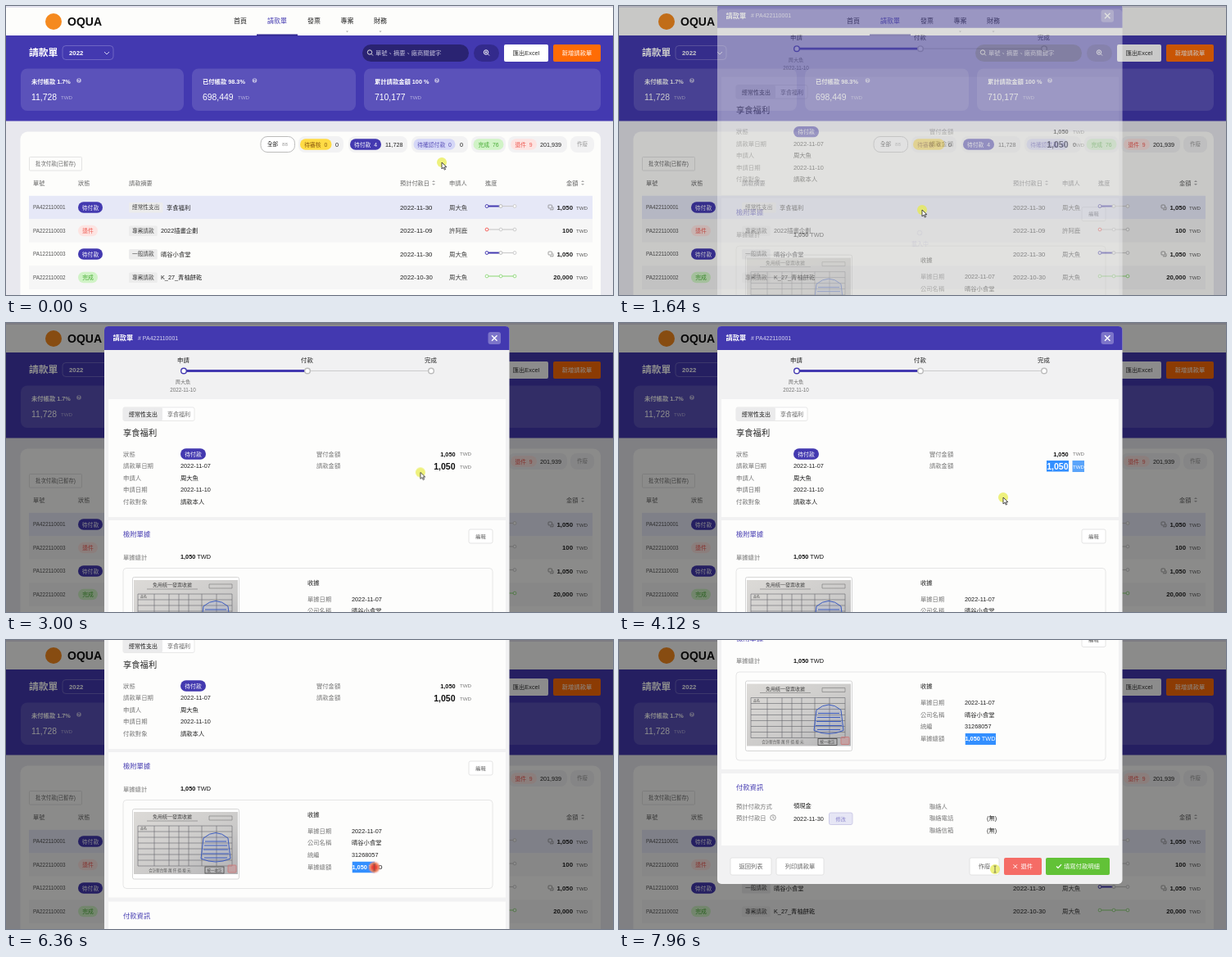
Write an HTML page that moves like this. It is 741 by 353 pixels and loops after 8 s.

```html
<!DOCTYPE html>
<html>
<head>
<meta charset="utf-8">
<title>請款單</title>
<style>
  html, body { margin: 0; width: 100%; height: 100%; overflow: hidden; background: #e8e8ee; }
  svg { display: block; width: 741px; height: 353px; }
  text { font-family: 'Liberation Sans', 'Noto Sans CJK TC', 'Noto Sans CJK', sans-serif; white-space: pre; }
</style>
</head>
<body>
<svg id="stage" viewBox="0 0 741 353"></svg>
<script>
const LOOP = 8000;
const INDIGO = '#4339b0', INK = '#222', GREY = '#777', RED = '#f4655f';

// Drawing helpers; text is centred vertically on y.
const text = (x, y, s, size = 7.3, fill = INK, weight = 400, anchor = 'start') =>
  `<text x="${x}" y="${y + size * .37}" font-size="${size}" fill="${fill}" font-weight="${weight}" text-anchor="${anchor}">${s}</text>`;
const mid = (x, y, s, size, fill, weight) => text(x, y, s, size, fill, weight, 'middle');
const end = (x, y, s, size, fill, weight) => text(x, y, s, size, fill, weight, 'end');
const box = (x, y, w, h, r, fill = 'none', stroke = 'none') =>
  `<rect x="${x}" y="${y}" width="${w}" height="${h}" rx="${r}" fill="${fill}" stroke="${stroke}" stroke-width=".8"/>`;
const path = (d, stroke, width = 1, fill = 'none') =>
  `<path d="${d}" fill="${fill}" stroke="${stroke}" stroke-width="${width}"/>`;
const dot = (x, y, r, fill, stroke = 'none', width = 1) =>
  `<circle cx="${x}" cy="${y}" r="${r}" fill="${fill}" stroke="${stroke}" stroke-width="${width}"/>`;
const help = (x, y, fill, mark) => dot(x, y, 2.8, fill) + mid(x, y, '?', 4.6, mark, 700);
const pill = (x, y, w, s, fill, color) => box(x, y - 6.7, w, 13.4, 6.7, fill) + mid(x + w / 2, y, s, 6.8, color);
const button = (x, y, w, h, s, fill, color, stroke = 'none', size = 7.3) =>
  box(x, y, w, h, 2, fill, stroke) + mid(x + w / 2, y + h / 2, s, size, color);
const sorter = (x, y) => path(`M${x - 2} ${y - 1}l2-2 2 2zM${x - 2} ${y + 1}l2 2 2-2z`, 'none', 0, '#aaa');
const group = (id, body) => `<g id="${id}">${body}</g>`;

const BADGES = {
  '待付款': [30, INDIGO, '#fff'],
  '退件': [24, '#fde4e2', '#ee5a52'],
  '完成': [24, '#d0f3c6', '#46aa34'],
};

function header() {
  const nav = [['首頁', 286], ['請款單', 331], ['發票', 376], ['專案', 416.5], ['財務', 457]];
  return box(0, 0, 741, 36, 0, '#fdfdfb') + box(0, 0, 741, 2, 0, '#e3e2ee') +
    dot(58, 19, 10, '#f58a1f') + text(75, 19, 'OQUA', 14, '#111', 700) +
    nav.map(([s, x], i) => mid(x, 18, s, 8, i == 1 ? INDIGO : '#222', 500)).join('') +
    [416.5, 457].map(x => path(`M${x - 1.5} 30.5h3l-1.5 1.8z`, 'none', 0, '#aaa')).join('') +
    box(0, 36, 741, 104.5, 0, INDIGO) + box(306, 34.5, 50, 2, 0, '#332a92');
}

function summary() {
  const cards = [
    [18, 199, 13, '未付帳款 1.7%', 89, '11,728', 67],
    [227, 200, 13, '已付帳款 98.3%', 303.5, '698,449', 283],
    [437, 289, 13, '累計請款金額 100 %', 526, '710,177', 493],
  ];
  return text(28, 57, '請款單', 11.8, '#fff', 700) +
    box(69, 48.5, 62, 17, 4, 'none', '#7a72c9') + text(77, 57, '2022', 7.8, '#fff', 700) +
    path('M120 56l3 3 3-3', '#d0cdf0') +
    box(435, 47, 130, 21, 10.5, '#2a2372') + dot(444, 56.5, 2.7, 'none', '#ddd') + path('M446 58.5l2 2', '#ddd') +
    text(451, 57.5, '單號、摘要、廠商關鍵字', 7.3, '#c3c0dc') +
    box(571, 47, 31, 21, 10.5, '#332a8c') + dot(586, 56.5, 2.7, 'none', '#fff') +
    path('M588 58.5l2 2M584.7 56.5h2.6M586 55.2v2.6', '#fff', .9) +
    button(608, 47, 54, 21, '匯出Excel', '#fff', '#333') +
    button(668, 47, 58, 21, '新增請款單', '#ff6c05', '#fff') +
    cards.map(([x, w, pad, label, q, amount, unit]) =>
      box(x, 76.5, w, 51.5, 8, '#5b52ba') + text(x + pad, 92, label, 7.3, '#fff', 700) +
      help(q, 91, '#bcb8e2', INDIGO) + text(x + pad, 111, amount, 10.4, '#fff') +
      text(unit, 111.5, 'TWD', 6.2, '#b5b1df')).join('');
}

function tabs() {
  const y = 169, shell = (x, w) => box(x, 159, w, 20, 8, '#f2f2f3');
  return box(311, 159.5, 41.5, 19, 8, '#fff', '#aaa') + text(319, y, '全部', 6.6) + text(337, y, '88', 6.2, '#999') +
    shell(357, 55) + pill(359, y, 38.5, '待審核  0', '#ffdb45', '#8b5a10') + text(402, y, '0', 7.2) +
    shell(418, 72) + pill(420, y, 38, '待付款  4', INDIGO, '#fff') + text(463, y, '11,728', 7.2) +
    shell(495, 69) + pill(497.5, y, 51, '待確認付款  0', '#d5d7f7', '#5950b8') + text(554, y, '0', 7.2) +
    shell(568, 42) + pill(570.5, y, 37, '完成  76', '#d0f3c6', '#46aa34') +
    shell(613, 72) + pill(616, y, 32, '退件  9', '#fde4e2', '#ee5a52') + text(652, y, '201,939', 7.2) +
    shell(689, 29) + mid(703.5, y, '作廢', 6.6, '#999');
}

function progress(y, status) {
  const done = { '待付款': [INDIGO, INDIGO, '#ccc'], '退件': [RED, '#ccc', '#ccc'], '完成': Array(3).fill('#9bdc88') }[status];
  return path(`M587 ${y}h17`, done[1], status == '待付款' ? 2 : 1.2) + path(`M604 ${y}h17`, done[2], 1.2) +
    done.map((c, i) => dot(587 + 17 * i, y, 1.9, '#fff', i == 1 && status == '待付款' ? '#bbb' : c, 1)).join('');
}

function table() {
  const heads = [[33, '單號'], [88, '狀態'], [150, '請款摘要'], [481, '預計付款日'], [541, '申請人'], [585, '進度'], [684, '金額']];
  const rows = [
    ['PA422110001', '待付款', '經常性支出', '享食福利', '2022-11-30', '周大魚', '1,050', '#e6e8f7'],
    ['PA222110003', '退件', '專案請款', '2022插畫企劃', '2022-11-09', '許阿鹿', '100', '#f6f6f6'],
    ['PA122110003', '待付款', '一般請款', '晴谷小食堂', '2022-11-30', '周大魚', '1,050', '#fdfdfb'],
    ['PA222110002', '完成', '專案請款', 'K_27_青柚餅乾', '2022-10-30', '周大魚', '20,000', '#f6f6f6'],
  ];
  return box(17.5, 153.5, 708.5, 230, 9, '#fdfdfb') + tabs() +
    box(28.5, 184.5, 64, 16.5, 1, '#fdfdfb', '#ddd') + mid(60.5, 193, '批次付款(已暫存)', 6.4, '#666') +
    heads.map(([x, s]) => text(x, 216, s, 7.2, '#666')).join('') + sorter(522, 216) + sorter(704, 216) +
    rows.map(([no, status, kind, name, date, person, amount, fill], i) => {
      const y = 246 + 28.5 * i, w = kind.length * 6.7 + 8, [bw, bg, fg] = BADGES[status];
      return box(28, y - 14.2, 688, 28.5, 0, fill) + text(33, y, no, 6.4, '#555') + pill(88, y, bw, status, bg, fg) +
        box(150, y - 6, w, 12.5, 1.5, '#ececec') + text(154, y, kind, 6.7, '#444') + text(i ? 189 : 196, y, name, 7.3) +
        text(481, y, date, 7.8) + text(541, y, person, 7.4, '#444') + progress(y - 1.5, status) +
        (amount == '1,050' ? box(662, y - 3, 4.5, 4, .8, 'none', '#888') + path(`M664 ${y + 2.8}h4v-3.5`, '#888', .8) : '') +
        end(692, y, amount, 7.8, INK, 700) + text(696, y + .3, 'TWD', 6.2, '#555');
    }).join('');
}

function receiptPhoto() {
  const lines = [331, 338, 345, 352, 359, 366, 373, 380].map(y => `M161 ${y}h115`).join('');
  const columns = [161, 181, 199, 211, 223, 239, 257, 276].map(x => `M${x} 331v49`).join('');
  return box(154.5, 310.5, 130, 85.5, 2, '#fff', '#ccc') + box(156, 314, 127, 76, 0, 'url(#paper)') +
    mid(203, 320, '免用統一發票收據', 6, '#444') + path('M172 325h62M248 319h28v5h-28z', '#777', .6) +
    path(lines + columns, '#66676c', .6) + text(164, 335, '品名', 4, '#555') +
    mid(200, 385, '合計新台幣 萬 仟 佰 拾 元', 4.5, '#555') +
    box(243, 381, 23, 8, 0, 'none', '#444') + mid(254.5, 385, '統一收訖', 4.5, '#444') +
    path('M241 346q15-13 30 0l3 25q-18 8-36 0zM243 350h26M242 355h28M241 360h30M240 365h32M242 370h28', '#3c5cc0', 1, '#6f89cf22') +
    box(271, 379, 10, 9, 1, '#d9888866', '#cc7777');
}

function modalTop() {
  const labels = ['狀態', '請款單日期', '申請人', '申請日期', '付款對象'];
  const values = ['', '2022-11-07', '周大魚', '2022-11-10', '請款本人'];
  const rowY = i => 160 + 14.5 * i;
  return box(120, 4, 494.5, 554.5, 5, '#f1f1f2') +
    path('M120 33V9q0-5 5-5h484.5q5 0 5 5v24z', 'none', 0, INDIGO) +
    text(130.5, 18, '請款單', 8.2, '#fff', 700) + text(161, 18, '# PA422110001', 7, '#d9d7f0') +
    box(588.5, 11, 15.5, 15, 3, '#7c74c9') + path('M593 15.2l6.5 6.5m0-6.5l-6.5 6.5', '#fff', 1.4) +
    path('M217 58.5h151', INDIGO, 2.8) + path('M368 58.5h151', '#ccc', 1.2) +
    [[217, '申請', INDIGO], [368, '付款', '#bbb'], [519, '完成', '#bbb']].map(([x, s, c]) =>
      dot(x, 58.5, 3.3, '#fff', c, 1.4) + mid(x - .5, 45, s, 7.4)).join('') +
    mid(216, 72, '周大魚', 6.2, GREY) + mid(216, 82, '2022-11-10', 6.3, GREY) +
    box(125, 93, 485, 144, 0, '#fdfdfc') + box(143, 103, 87, 16.5, 2, '#fff', '#e2e2e2') +
    box(143, 103, 48, 16.5, 2, '#ebebec') + text(150, 111.3, '經常性支出', 7) + text(197, 111.3, '享食福利', 7, '#666') +
    text(143, 134, '享食福利', 10.3, INK, 500) +
    labels.map((s, i) => text(143, rowY(i), s, 7.4, GREY) + text(213, rowY(i), values[i], 7.3)).join('') +
    pill(213, 160, 31, '待付款', INDIGO, '#fff') +
    text(379, 160, '實付金額', 7.3, GREY) + text(379, 174.5, '請款金額', 7.3, GREY) +
    end(548.5, 160, '1,050', 7.3, '#111', 700) + text(554, 160, 'TWD', 6.2, GREY) +
    end(548.5, 175, '1,050', 10.5, '#111', 700) + text(554, 176, 'TWD', 6.2, GREY) +
    group('totalPick', box(522, 168, 27, 13.5, 0, '#338fff') + box(553.5, 168, 14.5, 14, 0, '#5aa4fa') +
      end(548.5, 175, '1,050', 10.5, '#fff', 700) + text(554, 176, 'TWD', 6.2, '#fff'));
}

const sum = (x, y, fill) => text(x, y, `1,050 <tspan font-weight="400">TWD</tspan>`, 7.3, fill, 700);

function modalBottom() {
  const receipt = [['單據日期', '2022-11-07'], ['公司名稱', '晴谷小食堂'], ['統編', '31268057'], ['單據總額', '']];
  const contact = [['聯絡人', ''], ['聯絡電話', '(無)'], ['聯絡信箱', '(無)']];
  return box(125, 241, 485, 177.5, 0, '#fdfdfc') + text(143, 258, '檢附單據', 8.3, INDIGO, 500) +
    button(565, 252, 29, 17, '編輯', '#fff', '#666', '#ddd', 6.2) +
    text(143, 286, '單據總計', 7.3, GREY) + sum(213, 285.5, '#111') +
    box(143, 299.5, 451, 108, 4, 'none', '#e0e0e0') + receiptPhoto() + text(368, 317, '收據', 7.3, INK, 500) +
    receipt.map(([a, b], i) => text(368, 337 + 14.6 * i, a, 7.3, GREY) + text(422, 337 + 14.6 * i, b)).join('') +
    sum(422.5, 381, '#111') + group('receiptPick', box(422.5, 374.5, 37.5, 14, 0, '#338fff') + sum(422.5, 381, '#fff')) +
    box(125, 423.5, 485, 88, 0, '#fdfdfc') + text(143, 440.5, '付款資訊', 8.3, INDIGO, 500) +
    text(143, 463.5, '預計付款方式', 7.3, GREY) + text(213, 463, '領現金') +
    text(143, 478, '預計付款日', 7.3, GREY) + dot(188, 477.5, 3.3, 'none', '#777', .7) + path('M188 475.3v2.7h1.3', '#777', .7) +
    text(213, 478.5, '2022-11-30') + button(256.5, 471.5, 28.5, 14.5, '修改', '#e6e6f5', '#8a84cc', '#c4c2e2', 6.2) +
    contact.map(([a, b], i) => text(379, 463.5 + 14.5 * i, a, 7.3, GREY) + text(449, 463.5 + 14.5 * i, b)).join('') +
    button(136, 526.5, 50, 21, '返回列表', '#fff', '#666', '#ddd') +
    button(192, 526.5, 58, 21, '列印請款單', '#fff', '#666', '#ddd') +
    button(428, 526.5, 36, 21, '作廢', '#fff', '#666', '#ddd') +
    box(470, 526.5, 46, 21, 2, '#f56c66') + text(490.5, 537, '退件', 7.3, '#fff') +
    path('M481.5 534.8l4.5 4.5m0-4.5l-4.5 4.5', '#fff') +
    box(521, 526.5, 78, 21, 2, '#62c237') + text(543, 537, '填寫付款明細', 7.3, '#fff') +
    path('M534 537l2 2 4-4.3', '#fff', 1.2);
}

const loader = box(120, 4, 494.5, 554.5, 5, '#fff') +
  '<g transform="translate(367 277)"><g id="spinner">' +
  '<circle r="2.7" fill="none" stroke="#4339b0" stroke-width="1.3" stroke-dasharray="1.2 .92"/></g></g>' +
  mid(367.5, 290, '載入中', 7, INDIGO);

const pointer = dot(0, 0, 6, '#e8ec4ebb') + group('press', dot(0, 0, 8, 'url(#glow)')) +
  group('arrow', path('M0 0v8l2-1.8 1.3 2.9 1.3-.6-1.3-2.8h2.6z', '#222', .8, '#fff')) +
  group('beam', path('M-1.5-4h1.2m.6 0h1.2M0-4v8M-1.5 4h1.2m.6 0h1.2', '#554', .8));

document.getElementById('stage').innerHTML = `<defs>
  <linearGradient id="paper" x2="1" y2="1"><stop stop-color="#dcdad7"/><stop offset=".6" stop-color="#cbcac9"/><stop offset="1" stop-color="#b0b0b3"/></linearGradient>
  <radialGradient id="glow"><stop offset=".3" stop-color="#ee3b32"/><stop offset=".65" stop-color="#f47068" stop-opacity=".8"/><stop offset="1" stop-color="#f9a" stop-opacity="0"/></radialGradient>
  </defs>` + box(0, 0, 741, 353, 0, '#e8e8ee') + header() + summary() + table() +
  group('shade', box(0, 0, 741, 353, 0, '#000')) +
  group('modal', group('scroll', modalTop() + modalBottom()) + group('loading', loader)) +
  group('cursor', pointer);

// Each step is [ms, value, easing towards the next step].
function play(id, steps, style) {
  const all = [[0, steps[0][1]], ...steps, [LOOP, steps.at(-1)[1]]];
  const frames = all.map(([ms, v, easing = 'linear']) => ({ offset: ms / LOOP, easing, ...style(v) }));
  document.getElementById(id).animate(frames, { duration: LOOP, iterations: Infinity });
}
const opacity = v => ({ opacity: v });
const moveY = v => ({ transform: `translateY(${v}px)` });
const move = ([x, y]) => ({ transform: `translate(${x}px, ${y}px)` });
const reveal = v => ({ clipPath: `inset(0 ${100 - v}% 0 0)` });
const toggle = (id, first, ...times) =>
  play(id, [[0, first], ...times.flatMap((ms, i) => [[ms, (first + i) % 2], [ms, (first + i + 1) % 2]])], opacity);

const SOFT = 'ease-in-out';
play('cursor', [
  [740, [532, 191], SOFT], [1480, [370, 249]], [2440, [370, 249], SOFT], [3160, [521, 175]], [3240, [521, 175], SOFT],
  [3640, [568, 176]], [3720, [568, 176], SOFT], [4110, [469, 213]], [4960, [469, 213], 'ease-in'],
  [5160, [453, 239], 'ease-out'], [5400, [426, 274]], [6000, [426, 274], SOFT], [6560, [458, 279]],
  [7640, [458, 279]], [7800, [459, 280]],
], move);
toggle('press', 0, 1480, 1620, 3240, 3680, 5560, 6640);
toggle('arrow', 1, 3120, 3800, 5080);
toggle('beam', 0, 3120, 3800, 5080);
play('shade', [[1500, 0], [1800, .45]], opacity);
play('modal', [[1500, 0], [1800, 1]], opacity);
play('scroll', [[1500, -12], [1800, 0], [4160, 0, SOFT], [4880, -104], [7600, -104], [7640, -106.5], [7960, -260.5]], moveY);
play('loading', [[1600, 0], [1800, .9], [2140, .9], [2360, 0]], opacity);
play('spinner', [[1500, 0], [2500, 360]], v => ({ transform: `rotate(${v}deg)` }));
play('totalPick', [[3240, 0, SOFT], [3640, 100], [6000, 100], [6000, 0]], reveal);
play('receiptPick', [[6000, 0, SOFT], [6560, 100]], reveal);
</script>
</body>
</html>
```
